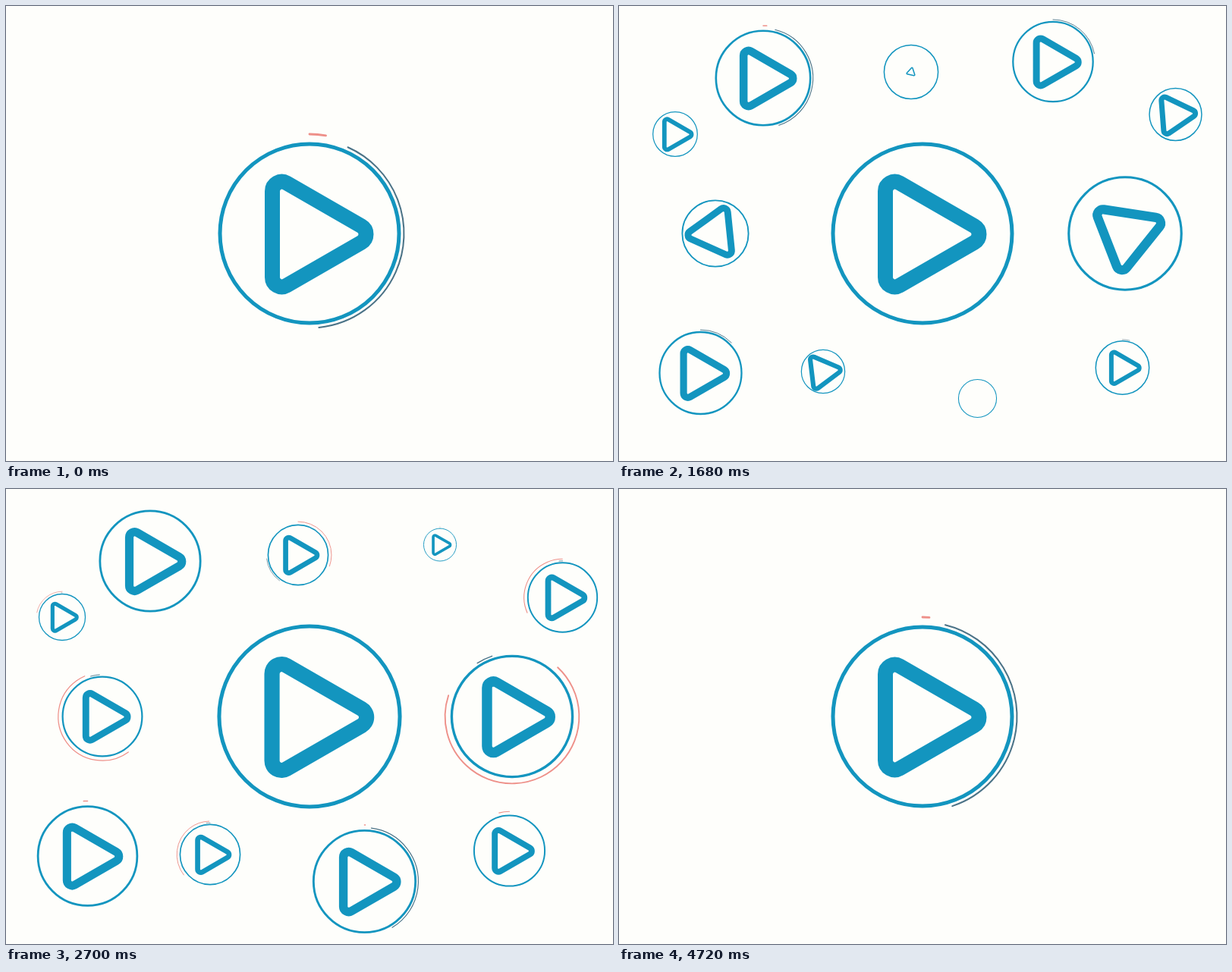
An HTML page with a canvas that plays this animation: 800 by 600 pixels, repeating every 4.74 s.

```html
<!DOCTYPE html>
<html lang="en">
<head>
<meta charset="utf-8">
<title>Play buttons</title>
<style>
  html, body { margin: 0; width: 100%; height: 100%; overflow: hidden; background: #fefefb; }
  canvas { display: block; }
</style>
</head>
<body>
<canvas id="stage" width="800" height="600"></canvas>
<script>
const LOOP = 4740;
const UNIT = 118; // ring radius the artwork is drawn at
const PAPER = '#fefefb', TEAL = '#1395bf', SLATE = '#4a7286', PINK = '#ee9089', RAY = '#dc8a78';
const ctx = document.getElementById('stage').getContext('2d');

const mix = (a, b, k) => a + (b - a) * k;
const progress = (t, from, to) => Math.min(1, Math.max(0, (t - from) / (to - from)));
const easeOut = x => 1 - (1 - x) ** 1.5;
const easeInOut = x => (1 - Math.cos(Math.PI * x)) / 2;

// Gentle start, fast middle, long settle: cubic-bezier(.4, 0, .1, 1).
function easeLate(x) {
  let lo = 0, hi = 1, s = .5;
  for (let i = 0; i < 20; i++) {
    s = (lo + hi) / 2;
    const at = 3 * s * (1 - s) ** 2 * .4 + 3 * s * s * (1 - s) * .1 + s ** 3;
    if (at < x) lo = s; else hi = s;
  }
  return s * s * (3 - 2 * s);
}

// Grows past the resting size by `extra`, then settles on it.
function pop(t, r, extra, start, peak, end) {
  return t < peak
    ? (r + extra) * easeOut(progress(t, start, peak))
    : r + extra * (1 - easeOut(progress(t, peak, end)));
}

// All of these run on a button's own clock in ms.
const RING_END = 950;
const ringSize = (t, r, extra) => pop(t, r, extra, 335, 690, RING_END);
const playSize = (t, r, extra) => pop(t, r, extra, 560, 850, 1140);
const spin = t => mix(390, -374, progress(t, 560, 885)) + 14 * easeOut(progress(t, 885, 980));
const slateHead = t => 360 * easeInOut(progress(t, 1045, 1935));
const slateTail = t => 360 * easeLate(progress(t, 1380, 2080));
const pinkHead = t => 360 * easeInOut(progress(t, 1425, 1965));
const pinkTail = t => 360 * easeLate(progress(t, 1680, 2380));

const CENTER = { x: 400, y: 300, r: UNIT, start: 3260, exit: 2673, extra: 30 };
const SATELLITES = [
  { x: 190, y: 95, r: 62.2, start: 220, exit: 2577 },
  { x: 572, y: 73.5, r: 52.7, start: 360, exit: 2170 },
  { x: 107.5, y: 484, r: 54, start: 430, exit: 2450 },
  { x: 663.5, y: 477, r: 35.2, start: 520, exit: 2450 },
  { x: 74, y: 169, r: 29.3, start: 700, exit: 2645 },
  { x: 733.5, y: 143, r: 34.3, start: 745, exit: 2450 },
  { x: 269, y: 482, r: 28.2, start: 760, exit: 2450 },
  { x: 127, y: 300, r: 41, start: 825, exit: 2450 },
  { x: 667, y: 300, r: 68.2, start: 895, exit: 2450 },
  { x: 385, y: 87, r: 28.2, start: 1075, exit: 2450 },
  { x: 472.5, y: 517.5, r: 61.6, start: 1260, exit: 2545 }
];

function stroke(color, width) {
  ctx.strokeStyle = color;
  ctx.lineWidth = width;
  ctx.stroke();
}

function arc(radius, tail, head, color, width) {
  if (head - tail < .3) return;
  const rad = deg => (deg - 90) * Math.PI / 180;
  ctx.beginPath();
  ctx.arc(0, 0, radius, rad(tail), rad(head));
  stroke(color, width);
}

function triangle() {
  ctx.beginPath();
  ctx.moveTo(-49, 0);
  ctx.arcTo(-49, -77.5, 87, 1, 12.5);
  ctx.arcTo(87, 1, -49, 79.5, 12.5);
  ctx.arcTo(-49, 79.5, -49, 0, 12.5);
  ctx.closePath();
  stroke(TEAL, 20);
}

function drawButton({ x, y, r, extra = 12 }, age, sinceExit) {
  // The exit plays the ring's entry backwards on the whole button.
  const exit = ringSize(RING_END - Math.max(0, sinceExit), r, extra) / r;
  const ring = ringSize(age, r, extra) / UNIT;
  const play = playSize(age, r, extra) / UNIT;
  if (exit < .005 || ring < .005) return;

  ctx.save();
  ctx.translate(x, y);
  ctx.scale(exit, exit);

  ctx.save();
  ctx.scale(ring, ring);
  arc(UNIT, 0, 360, TEAL, 5);
  arc(124.5, slateTail(age), slateHead(age), SLATE, 2);
  arc(131, pinkTail(age), pinkHead(age), PINK, 2.8);
  ctx.restore();

  if (play > .005) {
    ctx.rotate(spin(age) * Math.PI / 180);
    ctx.scale(play, play);
    triangle();
  }
  ctx.restore();
}

function drawRays(age) {
  if (age <= 0 || age >= 320) return;
  const inner = mix(52, 112, easeOut(progress(age, 0, 320)));
  const outer = mix(52, 112, easeOut(progress(age, 0, 100)));
  ctx.beginPath();
  for (let i = 0; i < 9; i++) {
    const a = Math.PI / 2 + i * Math.PI * 2 / 9;
    const c = Math.cos(a), s = Math.sin(a);
    ctx.moveTo(400.5 + c * inner, 300 + s * inner);
    ctx.lineTo(400.5 + c * outer, 300 + s * outer);
  }
  stroke(RAY, 1.3);
}

function draw(t) {
  ctx.fillStyle = PAPER;
  ctx.fillRect(0, 0, 800, 600);
  ctx.lineCap = 'round';

  for (const b of SATELLITES) drawButton(b, t - b.start, t - b.exit);

  // The centre button enters late in one loop and leaves in the next.
  const age = t - CENTER.start;
  if (age < 0) drawButton(CENTER, age + LOOP, t - CENTER.exit);
  else drawButton(CENTER, age, 0);
  drawRays(age);
}

function tick() {
  draw(performance.now() % LOOP);
  requestAnimationFrame(tick);
}
tick();
</script>
</body>
</html>
```
